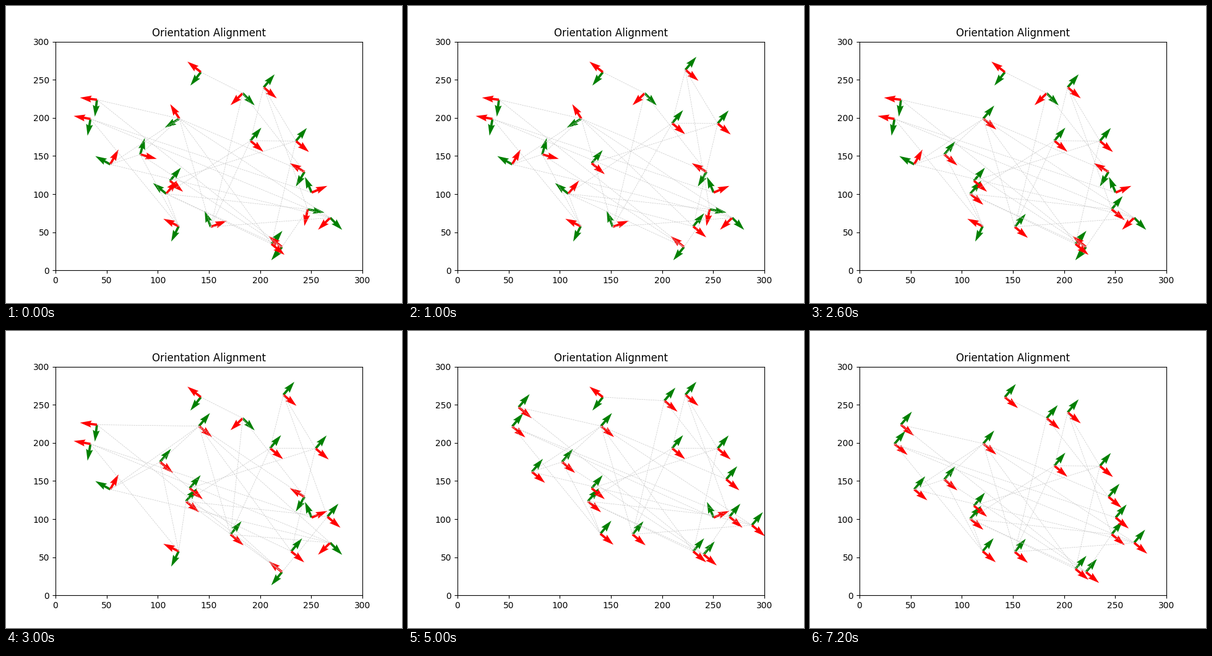
A matplotlib script that plays this animation: 640x480 px, repeating every 8000 ms.

```python
import numpy as np
import matplotlib.pyplot as plt
from matplotlib.animation import FuncAnimation
from matplotlib.collections import LineCollection

HEADING = -40   # common orientation of the x axis, degrees
STEP = 30       # distance aligned agents move along their y axis
LAST = 6

# Agents grouped by the frame in which they align: x, y, initial angle
GROUPS = {
    0: [(203.5, 240, HEADING), (190.5, 170, HEADING), (235, 169.6, HEADING),
        (111.9, 117.5, HEADING), (211.1, 34.7, HEADING)],
    2: [(121, 199, 122), (82.9, 152, -15), (108.3, 100.4, 51),
        (151.8, 57, 21), (246.5, 80.1, 259)],
    4: [(40.5, 223.8, 173), (34.2, 198.6, 170), (53.5, 139, 61),
        (120.4, 57.8, 154), (183, 232.3, 224.5), (243.4, 129.2, 149.5),
        (268.5, 69, 224.7), (221.4, 30.6, 141)],
    6: [(250.4, 102, 23), (142.1, 260, 142)],
}
# Neighbours, agents lettered in the order above
LINKS = ("TO OI OP AB AC AJ CE BC BI BH CD FK FM FG FI FE FP FQ LN LS LQ KR "
         "MG MQ GN GR HJ HE HR HN IQ RJ")

agents = np.array([agent for group in GROUPS.values() for agent in group])
home, start_angle = agents[:, :2], agents[:, 2]
join = np.repeat(list(GROUPS), [len(group) for group in GROUPS.values()])
links = np.array([[ord(c) - ord("A") for c in pair] for pair in LINKS.split()])


def unit(degrees):
    rad = np.radians(degrees)
    return np.stack([np.cos(rad), np.sin(rad)], axis=-1)


def state(frame):
    frame = min(frame, LAST)
    aligned = frame >= join
    angle = np.where(aligned, HEADING, start_angle)
    shift = STEP * (frame % 2) * unit(HEADING + 90)
    return home + aligned[:, None] * shift, angle


fig, ax = plt.subplots(figsize=(6.4, 4.8), dpi=100)
ax.set(xlim=(0, 300), ylim=(0, 300), title="Orientation Alignment")


def make_axis(color):
    return ax.quiver(*home.T, *unit(start_angle).T, color=color,
                     scale=18, width=0.0075, zorder=1)


y_axes, x_axes = make_axis("green"), make_axis("red")
edges = LineCollection(home[links], colors="0.78", linewidths=0.5,
                       linestyles="--", zorder=2)
ax.add_collection(edges, autolim=False)


def update(frame):
    pos, angle = state(frame)
    for arrows, turn in ((x_axes, 0), (y_axes, 90)):
        arrows.set_offsets(pos)
        arrows.set_UVC(*unit(angle + turn).T)
    edges.set_segments(pos[links])
    return x_axes, y_axes, edges


anim = FuncAnimation(fig, update, frames=8, interval=1000, repeat=True)
plt.show()
```
